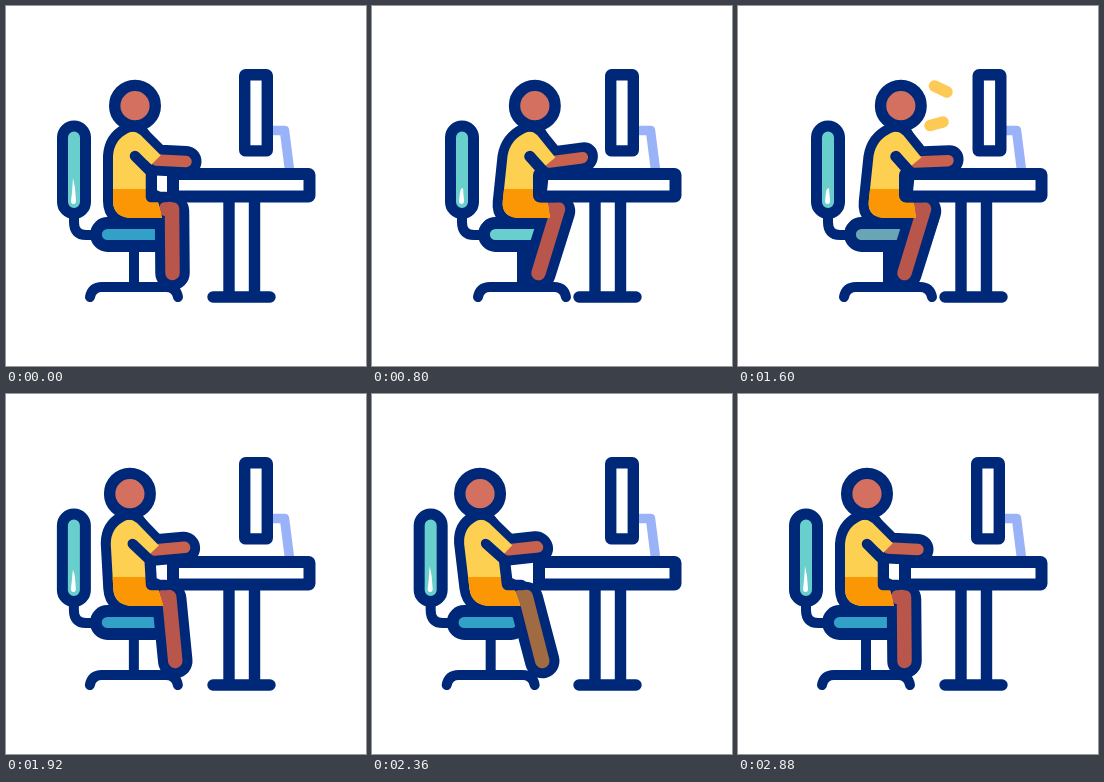
These frames come from a looping animation (360 px wide and 360 px high, 3000 ms). An HTML page with a canvas:

```html
<!DOCTYPE html>
<html lang="en">
<head>
<meta charset="utf-8">
<title>Working at a desk</title>
<style>
  html, body { margin: 0; height: 100%; overflow: hidden; background: #fff; }
  canvas { display: block; width: 360px; height: 360px; }
</style>
</head>
<body>
<canvas id="stage" width="360" height="360"></canvas>
<script>
const ctx = document.getElementById('stage').getContext('2d');
const LOOP = 3000, STEP = 40;
const NAVY = '#002878', SKIN = '#d3705f', ARM = '#c9614f', LEG = '#b8564c',
      YELLOW = '#fdd052', ORANGE = '#fb9704', TEAL = '#69cfcd',
      SEAT = '#33a0c8', STAND = '#99b2f8', SPARK = '#fdca55';

ctx.lineJoin = 'round';

function stroke(path, color, width, cap = 'round') {
  ctx.lineCap = cap;
  ctx.strokeStyle = color;
  ctx.lineWidth = width;
  ctx.stroke(new Path2D(path));
}

function fill(path, color) {
  ctx.fillStyle = color;
  ctx.fill(new Path2D(path));
}

function box(x, y, w, h, radius, color, width) {
  ctx.beginPath();
  ctx.roundRect(x, y, w, h, radius);
  ctx.fillStyle = color;
  ctx.fill();
  ctx.strokeStyle = NAVY;
  ctx.lineWidth = width;
  ctx.stroke();
}

function ease(t, from, to) {
  const u = Math.min(1, Math.max(0, (t - from) / (to - from)));
  return (1 - Math.cos(Math.PI * u)) / 2;
}

function drawChair(shift, forward, seatColor) {
  ctx.save();
  ctx.translate(shift, 0);
  stroke('M68 210V216Q68 229 80 229H90', NAVY, 10);
  box(56.5, 120, 23, 87.5, 11.5, TEAL, 11);
  fill(`M67 ${172 + 11 * forward}L69 182L70 195Q70 198 67.5 198Q65 198 65 195L66 186Z`, '#fff');
  stroke('M128 240V281M84 291Q86 281 96 281H160Q170 281 172 291', NAVY, 10);
  box(90, 217, 70, 23, 11.5, seatColor, 11.8);
  ctx.restore();
}

function drawDesk(push) {
  stroke('M262 124.5H278.5L283.5 164', STAND, 9.5, 'butt');
  box(238.7 + push, 68.7, 22.6, 76.2, 1, '#fff', 11.4);
  stroke('M223 195V291M248.5 195V291M207 291H264', NAVY, 11.4);
  box(167, 168, 136.5, 22.5, 1, '#fff', 12);
}

function drawSparks(t) {
  if (t < 1140 || t > 1740) return;
  const head = ease(t, 1160, 1400), tail = ease(t, 1600, 1760);
  const spark = (x, y, dx, dy) =>
    stroke(`M${x + dx * tail} ${y + dy * tail}L${x + dx * head + .01} ${y + dy * head}`, SPARK, 11.5);
  spark(196.5, 80, 12.5, 6);
  spark(192, 119.5, 13, -3.5);
}

function draw(t) {
  const back0 = ease(t, 1670, 2070);
  const forward = ease(t, 200, 600) * (1 - back0);
  const back = back0 * (1 - ease(t, 2280, 2760));

  const shift = 22 * forward - 10 * back;
  const hip = 22 * forward - 8 * back;
  const lean = (9 * forward - 11 * back) / 86;
  const knee = 166 + 20 * forward - 13 * back;
  const foot = 166.5 + 4 * back;
  const tap = 1 + Math.cos((t - 1160) / 320 * 2 * Math.PI);

  const seatColor = t < 640 || t >= 1700 ? SEAT : t < 1400 ? TEAL : '#69a5b4';
  const legColor = t >= 2100 && t < 2440 ? '#a06b42' : LEG;

  // The upper body shears around the seat line at y = 212.
  const leanBody = () => {
    ctx.save();
    ctx.transform(1, 0, -lean, 1, hip + 212 * lean, 0);
  };

  ctx.fillStyle = '#fff';
  ctx.fillRect(0, 0, 360, 360);
  drawChair(shift, forward, seatColor);

  const torso = 'M107 150Q108 134 122 127Q128 124 133 128L141 140V190L152 196L156 212H127Q107 212 107 195Z';
  const elbow = `150 ${154 + 2 * forward + 2 * back}`;
  const hand = `${180 + 2 * forward} ${155.5 - 2.2 * forward * tap - 3 * back}`;
  const upperArm = `M129 133L${elbow}`;

  stroke(`M${knee} 205L${foot} 267`, NAVY, 34.5);
  leanBody();
  stroke(torso, NAVY, 20);
  stroke(`${upperArm}L${hand}`, NAVY, 31);
  ctx.restore();

  stroke(`M${knee - 6} 203H${knee}L${foot} 267`, legColor, 14.5);
  leanBody();
  fill(torso, YELLOW);
  ctx.save();
  ctx.clip(new Path2D('M90 183H170V220H90Z'));
  fill(torso, ORANGE);
  ctx.restore();
  stroke(`M${elbow}L${hand}`, ARM, 11.5);
  stroke(upperArm, YELLOW, 13.5, 'butt');
  ctx.restore();

  drawDesk(1.5 * ease(t, 1160, 1400) * (1 - ease(t, 1600, 1760)));

  leanBody();
  stroke('M129 150L145 166V191H160', NAVY, 10.5);
  ctx.restore();

  ctx.beginPath();
  ctx.arc(129 + hip + 113 * lean, 99.7, 20.3, 0, 2 * Math.PI);
  ctx.fillStyle = SKIN;
  ctx.fill();
  ctx.strokeStyle = NAVY;
  ctx.lineWidth = 11.4;
  ctx.stroke();

  drawSparks(t);
}

function frame(now) {
  draw(Math.floor((now % LOOP) / STEP) * STEP);
  requestAnimationFrame(frame);
}
requestAnimationFrame(frame);
</script>
</body>
</html>
```
